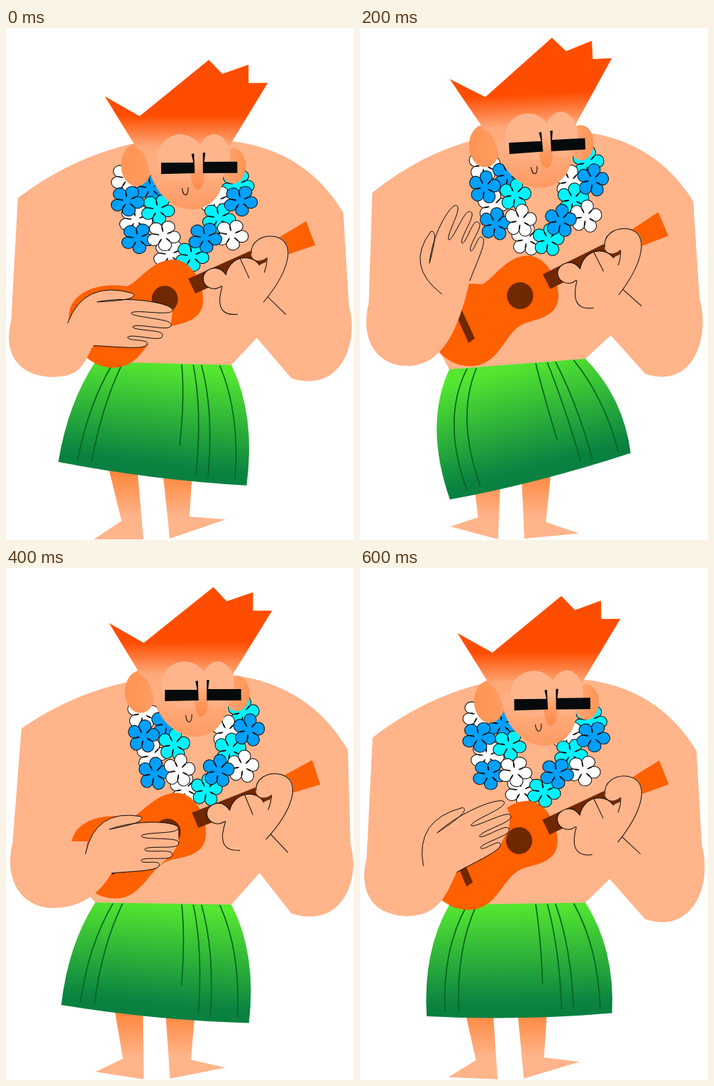
Write an HTML page with a canvas that moves like this. It is 491 px wide and 723 px high and loops after 640 ms.

```html
<!DOCTYPE html>
<html lang="en">
<head>
<meta charset="utf-8">
<title>Ukulele player</title>
<style>
html, body { margin: 0; width: 100%; height: 100%; overflow: hidden; background: #fff; }
canvas { display: block; }
</style>
</head>
<body>
<canvas id="stage" width="491" height="723"></canvas>
<script>
const ctx = document.getElementById('stage').getContext('2d');
const LOOP = 640, BEAT = 320, STEP = 40;
const SKIN = '#ffb48a', BROWN = '#702800', WOOD = '#ff6000', INK = '#0a0a0a';
const BLUE = '#00a0ff', CYAN = '#00f4ff', WHITE = '#fff';

const wave = (t, period, lag) => Math.cos(2 * Math.PI * (t - lag) / period);
const mix = (a, b, s) => [a[0] + (b[0] - a[0]) * s, a[1] + (b[1] - a[1]) * s];
const add = (p, x, y) => [p[0] + x, p[1] + y];

// Every part bounces on the beat with its own lag; the upper body also sways slowly.
function pose(t) {
  const beat = lag => wave(t, BEAT, lag);
  const sway = wave(t, LOOP, 366);
  const lean = beat(195);

  const head = { x: 270.5 + 8 * beat(5) + 6.8 * sway, y: 180 + 18 * beat(0), turn: -1.2 + 2.2 * beat(0) + 1.4 * sway };
  const uke = { x: 226 + 2.2 * sway, y: 378 + 7 * beat(-40), turn: 2 * beat(30) + 1.6 * sway };
  const left = {
    neck: [head.x - 95, head.y * .25 + 114],
    shoulder: [18.5 + 2.5 * beat(-20) + 4.5 * sway, 233 + 3 * beat(-30) - 5 * sway],
    elbow: [10 - 2.5 * beat(40) + sway, 396 + 14 * beat(-10) - 4 * sway],
    low: [67, 482.5 + 10.5 * beat(-12)]
  };
  const right = {
    neck: [head.x + 47, head.y * .45 + 71],
    shoulder: [475.5 + 6 * beat(10) + 6 * sway, 253 + 11.5 * beat(0) + 4 * sway],
    elbow: [482.5 + 3.5 * beat(25) + 2 * sway, 387.5 + 8.5 * beat(-5) + 4 * sway],
    corner: [402.5, 490 + 7.5 * beat(-30) + 2 * sway],
    bend: [355 + 3 * beat(100), 434 + 5 * beat(-40)]
  };
  const hand = {
    x: 121 + 26 * beat(65), y: 359 + 32 * beat(10) + 4 * sway,
    turn: -26 + 40 * beat(45) - 7 * sway, reach: .97 + .1 * beat(0)
  };
  const skirt = {
    tl: [126, 476 + 6 * lean], tr: [318, 472 - 5 * lean],
    bl: [97 + 30 * lean, 636 + 30 * lean], br: [358 + 24 * lean, 626 - 26 * lean]
  };
  const dip = [5 + 8 * beat(95) + 6 * sway, -11.5 + 12 * beat(15)];
  const lei = {
    start: [dip[0], dip[1] * .85], dip, end: [(head.x - 272.5) * .85, (head.y - 198) * 1.08],
    swell: beat(-20)
  };
  return { head, uke, left, right, hand, skirt, lei, step: .5 - .5 * beat(0) };
}

const fillPath = (d, fill) => { ctx.fillStyle = fill; ctx.fill(new Path2D(d)); };
const strokePath = (d, color = INK, width = 1) => {
  ctx.strokeStyle = color;
  ctx.lineWidth = width;
  ctx.stroke(new Path2D(d));
};
const poly = (pts, fill) => fillPath('M' + pts.join(' ') + 'Z', fill);
function ellipse(x, y, rx, ry, fill) {
  ctx.fillStyle = fill;
  ctx.beginPath();
  ctx.ellipse(x, y, rx, ry, 0, 0, 7);
  ctx.fill();
}
function gradient(x0, y0, x1, y1, ...stops) {
  const g = ctx.createLinearGradient(x0, y0, x1, y1);
  stops.forEach(([at, color]) => g.addColorStop(at, color));
  return g;
}
function placed({ x, y, turn }, draw) {
  ctx.save();
  ctx.translate(x, y);
  ctx.rotate(turn * Math.PI / 180);
  draw();
  ctx.restore();
}

function drawLegs(q) {
  const s = 18 * q;
  const shade = gradient(0, 630, 0, 690, [0, '#ff8840'], [1, SKIN]);
  poly([[142 + s, 610], [184 + s, 610], [194 + q, 722], [124 + 4 * q, 722 - 21 * q], [163 + 4 * q, 696 - 6 * q]], shade);
  poly([[219 + s / 2, 605], [264 + s / 2, 605], [259 + 4 * q, 690 + 9 * q], [310 - q, 694 + 23 * q], [231 + q, 721]], shade);
}

// The rounded left elbow, from its lowest point up to the side.
const elbowCurve = ({ low, elbow }) => `C${add(low, -42, 0)} ${add(elbow, -13, 54)} ${elbow}`;

function drawBody(left, right, { tl, tr }) {
  const { neck, shoulder, low } = left;
  const a = add(mix(shoulder, neck, .5), -6, -18);
  const b = add(mix(right.neck, right.shoulder, .5), 25, -38);
  fillPath(`M${low}${elbowCurve(left)}L${shoulder}Q${a} ${neck}L${right.neck}Q${b} ${right.shoulder}
    L${right.elbow}C${add(right.elbow, 15, 51)} ${add(right.corner, 70, 23)} ${right.corner}L${right.bend}
    L${tr}L${add(tr, -5, 6)}L${add(tl, 10, 8)}L${tl}L112 456L${add(low, 30, -12)}Z`, SKIN);
}

// Five petals drawn in one line that loops inward between them.
const bloom = new Path2D();
for (let i = 0; i <= 150; i++) {
  const a = i * Math.PI / 75;
  const r = 14.5 + 8.5 * Math.cos(5 * a), turn = a + .3 * Math.sin(5 * a);
  bloom.lineTo(r * Math.sin(turn), -r * Math.cos(turn));
}

const FLOWERS = [
  [174, 212, WHITE], [207, 226, BLUE], [327, 221, CYAN], [186, 271, WHITE], [299, 244, WHITE],
  [302, 268, CYAN], [217, 256, CYAN], [174, 244, BLUE], [234, 320, WHITE], [265, 322, CYAN],
  [320, 292, WHITE], [189, 297, BLUE], [225, 293, WHITE], [283, 296, BLUE], [332, 244, BLUE]
];

function drawLei({ start, dip, end, swell }) {
  for (const [x, y, color] of FLOWERS) {
    const u = Math.atan2(y - 200, 251 - x) / Math.PI;
    const shift = k => start[k] * (1 - u) * (1 - 2 * u) + 4 * dip[k] * u * (1 - u) + end[k] * u * (2 * u - 1);
    ctx.save();
    ctx.translate(x + shift(0), y + shift(1));
    ctx.scale(1 + .05 * swell, 1 - .06 * swell);
    ctx.rotate(.25 + .25 * swell);
    ctx.fillStyle = color;
    ctx.fill(bloom);
    ctx.strokeStyle = INK;
    ctx.lineWidth = 1;
    ctx.stroke(bloom);
    ctx.restore();
  }
}

function drawHead() {
  ellipse(-88, -5, 22, 30, gradient(-108, 0, -66, 0, [0, '#ff9454'], [1, '#ff9c62']));
  ellipse(48, -3, 18, 25, gradient(30, 0, 66, 0, [0, '#ffa878'], [1, '#ff9454']));
  fillPath(`M-132.5 -102L-83.5 -74L14.5 -153L33.5 -133L70.5 -146V-120H97.5L43.5 -32
    C36 -10 34 8 33 20C30 42 12 58 -10 58C-42 58 -64 30 -70 2C-74 -16 -78 -24 -88 -29Z`,
    gradient(0, -153, 0, 58, [0, '#ff4d00'], [.37, '#ff4d00'], [.58, '#ffa878'], [.72, '#ffb084'], [1, '#ff9a62']));
  const glow = gradient(0, -48, 0, 35, [0, '#ffb58c'], [.5, '#ffb58c'], [1, 'rgba(255,181,140,0)']);
  ellipse(-26, -14, 33, 34, glow);
  ellipse(21, -16, 23, 32, glow);
  ellipse(-2, 8, 9.5, 22, gradient(0, -12, 0, 30, [0, '#ffb084'], [.5, '#ff9a60'], [1, '#ff8b49']));
  poly([[-53.5, -8], [-8, -8], [-10.5, -20], [-7, -21], [-6, 7], [-53.5, 8]], '#060a0c');
  poly([[5.5, -22], [9, -22], [7.5, -9], [54, -9], [54, 7], [5.5, 7]], '#060a0c');
  strokePath('M-24 28C-23 40 -15 42 -15.5 27');
}

function drawSkirt({ tl, tr, bl, br }) {
  const bulge = 18 + .2 * (bl[0] - tl[0]);
  const top = mix(tl, tr, .5), base = mix(bl, br, .5);
  const dx = br[0] - bl[0], dy = br[1] - bl[1], len = Math.hypot(dx, dy);
  const nx = -dy / len, ny = dx / len;
  const drop = (base[0] - top[0]) * nx + (base[1] - top[1]) * ny;
  const shade = gradient(top[0], top[1], top[0] + nx * drop, top[1] + ny * drop,
    [0, '#55e830'], [.9, '#0a8341'], [1, '#088040']);
  fillPath(`M${tl}L${tr}Q${add(mix(tr, br, .45), 25, -5)} ${br}Q${add(base, 0, 9)} ${bl}
    Q${add(mix(tl, bl, .45), -2 * bulge, -5)} ${tl}Z`, shade);
  for (const u of [.13, .2, .635, .72, .78, .915]) {
    const long = u === .635 ? .72 : .96;
    const a = add(mix(tl, tr, u), 0, 1);
    const b = mix(a, mix(bl, br, 1.08 * u - .046), long);
    const side = -2.6 * bulge + (24 + 2.6 * bulge) * u;
    strokePath(`M${a}Q${add(mix(a, b, .42), side * long, 0)} ${b}`, '#04661f', 1.7);
  }
}

function drawUke() {
  fillPath(`M-54 -18C-38 -22 -18 -58 14 -56C40 -54 56 -18 54 4C52 30 25 34 9 38
    C-25 46 -28 97 -73 97C-108 97 -140 60 -135 20C-130 -12 -90 -24 -54 -18Z`, WOOD);
  ellipse(0, 0, 18.5, 19, BROWN);
  poly([[-86, 10], [-66, 58], [-75, 64], [-93, 20]], BROWN);
  poly([[33, -29], [150, -82], [158, -60], [43, -8]], BROWN);
  poly([[158, -86], [199, -111], [212, -77], [166, -61]], WOOD);
}

function drawFretHand() {
  const blob = 'M80 -19C68 -10 54 -18 54 -30C54 -42 74 -52 86 -35';
  const bump = 'C92 -62 122 -66 134 -48';
  const loop = 'C136 -52 120 -52 121 -70C122 -86 150 -95 165 -86C188 -70 166 -32 139 4';
  fillPath(`${blob}${bump}L142 -49L144 -60${loop}L103 21C75 25 74 2 80 -19Z`, SKIN);
  strokePath(blob + bump);
  strokePath('M122 -64C120 -80 135 -92 155 -89C188 -82 174 -38 139 4');
  strokePath('M144 -59Q144 -48 140 -38M106 -58L119 -30M145 -4L171 21M81 -19C75 2 74 24 103 21');
}

function drawStrumArm(hand, left) {
  // Hand points: along the fingers, then across them, from the root of the thumb.
  const angle = hand.turn * Math.PI / 180, c = Math.cos(angle), s = Math.sin(angle);
  const at = (u, v) => [hand.x + u * hand.reach * c - v * s, hand.y + u * hand.reach * s + v * c];
  const start = at(-36, 34), root = at(0, 0), wrist = at(1, 62);
  const tips = [[100, 0], [100, 22], [90, 38], [71, 53]];

  const thumb = `Q${at(-20, -30)} ${at(46, -17)}C${at(54, -9)} ${at(25, -4)} ${root}`;
  let fingers = `C${at(40, -13)} ${at(95, -9)} ${at(100, 0)}`;
  for (let i = 0; i < 3; i++) {
    const [u, v] = tips[i], [u2, v2] = tips[i + 1];
    const k = (u + u2) / 2 - 54 + 9 * i, m = (v + v2) / 2;
    fingers += `C${at(u + 3, v + 11)} ${at(k + 4, m - 7)} ${at(k, m)}C${at(k + 2, m + 6)} ${at(u2 + 3, v2 - 9)} ${at(u2, v2)}`;
  }
  fingers += `C${at(69, 61)} ${at(32, 60)} ${wrist}`;

  const { low, elbow } = left;
  const dy = low[1] - wrist[1], edge = start[1] - 18;
  fillPath(`M${start}${thumb}L${tips.map(p => at(...p)).join('L')}L${wrist}
    C${add(wrist, -14, dy * .5)} ${add(low, 35 + dy * .15, 0)} ${low}${elbowCurve(left)}
    L${elbow[0] + 3} ${edge}L${start[0] + 3} ${edge}Z`, SKIN);
  fillPath(`M${root}${fingers}Z`, SKIN);
  strokePath(`M${start}${thumb}`);
  strokePath(`M${root}${fingers}`);
}

function draw(t) {
  const p = pose(t);
  ctx.fillStyle = '#fff';
  ctx.fillRect(0, 0, 491, 723);
  drawLegs(p.step);
  drawBody(p.left, p.right, p.skirt);
  drawLei(p.lei);
  placed(p.head, drawHead);
  drawSkirt(p.skirt);
  placed(p.uke, () => { drawUke(); drawFretHand(); });
  drawStrumArm(p.hand, p.left);
}

const begin = performance.now();
function tick() {
  const t = (performance.now() - begin) % LOOP;
  draw(Math.floor(t / STEP) * STEP);
  requestAnimationFrame(tick);
}
tick();
</script>
</body>
</html>
```
